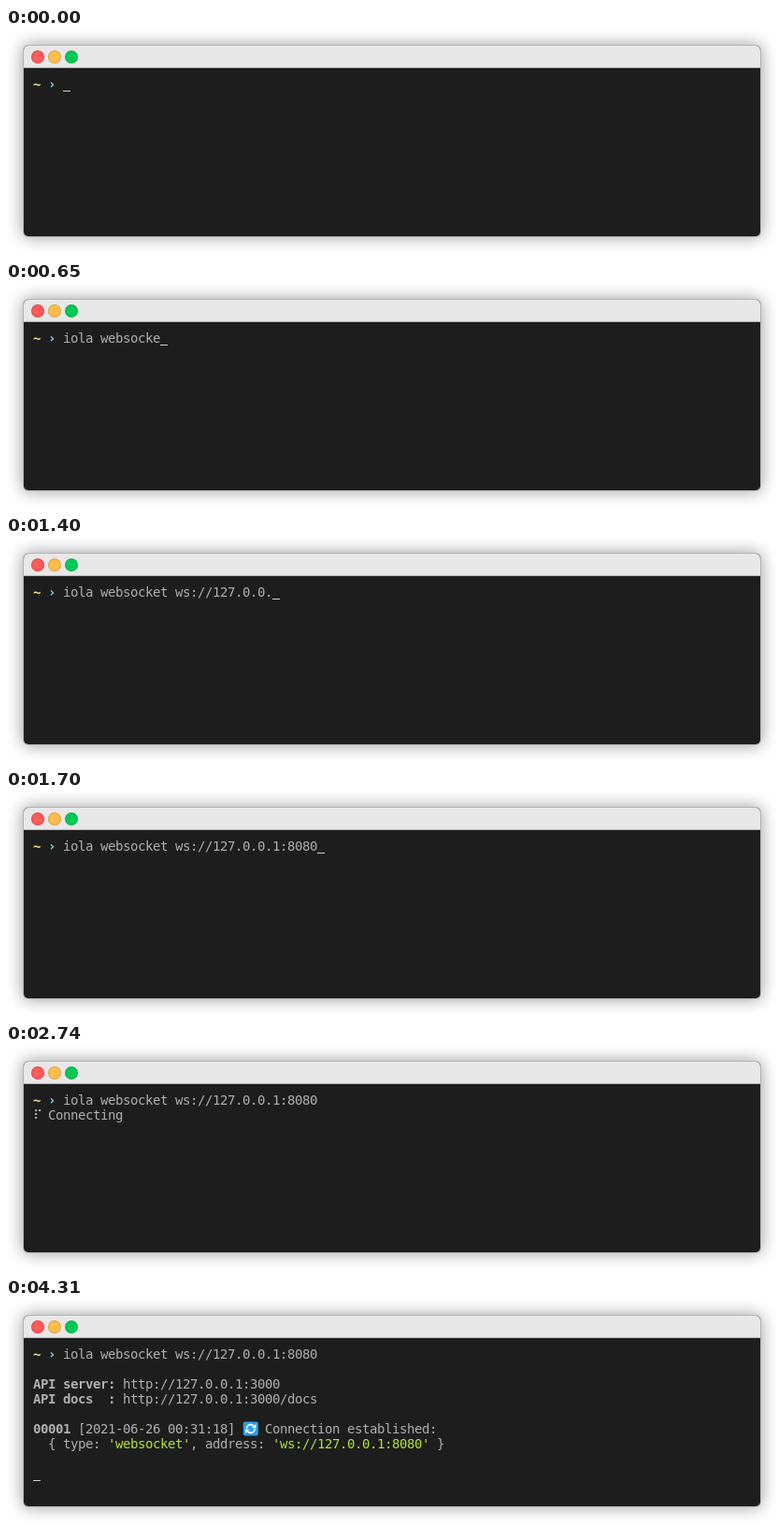
These frames come from a looping animation (826 px wide and 242 px high, 6780 ms). An HTML page with a canvas:

```html
<!DOCTYPE html>
<html lang="en">
<head>
<meta charset="utf-8">
<title>Terminal session</title>
<style>
  html, body { margin: 0; width: 100%; height: 100%; overflow: hidden; background: #fff; }
  canvas { display: block; width: 826px; height: 242px; }
</style>
</head>
<body>
<canvas id="stage" width="826" height="242"></canvas>
<script>
const ctx = document.getElementById('stage').getContext('2d');

const LOOP = 6780;
const KEY_DELAY = 50;
const SPIN_START = 2020, SPIN_STEP = 80, SPIN_END = 3020;
const SERVER_READY = 3310, CONNECTED = 4310;

const CELL = { w: 8, h: 16, left: 29, top: 52, ascent: 13 };
const FONT = '14px "DejaVu Sans Mono", "DejaVu Sans", monospace';
const COLOR = {
  text: '#afafaf', cursor: '#d2d2d2', path: '#ebdf86', prompt: '#75dff2',
  string: '#b3e33b', body: '#1d1d1d', bar: '#e8e8e8', border: '#b3b3b3'
};
const BUTTONS = [['#ff5c5c', '#e33e41'], ['#ffbd4c', '#e09e3e'], ['#00ca56', '#14ae46']];
const COMMAND = 'iola websocket ws://127.0.0.1:8080';
const SPINNER = [...'⠋⠙⠹⠸⠼⠴⠦⠧⠇⠏'];

const cellX = col => CELL.left + col * CELL.w;
const cellY = row => CELL.top + row * CELL.h;

function print(row, col, text, color = COLOR.text, bold = false) {
  ctx.font = (bold ? 'bold ' : '') + FONT;
  ctx.fillStyle = color;
  [...text].forEach((char, i) => {
    if (char !== ' ') ctx.fillText(char, cellX(col + i), cellY(row) + CELL.ascent);
  });
}

function cursor(row, col) {
  ctx.fillStyle = COLOR.cursor;
  ctx.fillRect(cellX(col), cellY(row) + CELL.h - 1, CELL.w, 1);
}

function roundRect(x, y, w, h, r, color) {
  ctx.beginPath();
  ctx.roundRect(x, y, w, h, r);
  ctx.fillStyle = color;
  ctx.fill();
}

function disc(x, y, r, color) {
  ctx.beginPath();
  ctx.arc(x, y, r, 0, 2 * Math.PI);
  ctx.fillStyle = color;
  ctx.fill();
}

function drawWindow() {
  ctx.fillStyle = '#fff';
  ctx.fillRect(0, 0, 826, 242);
  ctx.save();
  ctx.shadowColor = 'rgba(0, 0, 0, 0.4)';
  ctx.shadowBlur = 18;
  roundRect(18, 18, 790, 206, 6, COLOR.border);
  ctx.restore();
  roundRect(19, 19, 788, 204, 5, COLOR.body);
  roundRect(19, 19, 788, 23, [5, 5, 0, 0], COLOR.bar);
  ctx.fillStyle = COLOR.border;
  ctx.fillRect(19, 42, 788, 1);
  BUTTONS.forEach(([fill, edge], i) => {
    disc(34 + i * 18, 31, 7, edge);
    disc(34 + i * 18, 31, 6, fill);
  });
}

function drawRefreshIcon(row, col) {
  ctx.save();
  ctx.translate(cellX(col) + 8.8, cellY(row) + 8);
  roundRect(-8, -7.5, 16, 15, 2, '#2d9fe3');
  ctx.strokeStyle = ctx.fillStyle = '#fff';
  ctx.lineWidth = 1.7;
  for (let half = 0; half < 2; half++) {
    ctx.beginPath();
    ctx.arc(0, 0, 4.3, Math.PI * 1.02, Math.PI * 1.75);
    ctx.stroke();
    ctx.beginPath();
    ctx.moveTo(5.6, -5.2);
    ctx.lineTo(5.6, -0.6);
    ctx.lineTo(1.2, -0.9);
    ctx.fill();
    ctx.rotate(Math.PI);
  }
  ctx.restore();
}

function drawServerInfo() {
  print(2, 0, 'API server:', COLOR.text, true);
  print(2, 12, 'http://127.0.0.1:3000');
  print(3, 0, 'API docs  :', COLOR.text, true);
  print(3, 12, 'http://127.0.0.1:3000/docs');
}

function drawConnection() {
  print(5, 0, '00001', COLOR.text, true);
  print(5, 6, '[2021-06-26 00:31:18]');
  drawRefreshIcon(5, 28);
  print(5, 31, 'Connection established:');
  print(6, 2, '{ type:            , address:                       }');
  print(6, 10, "'websocket'", COLOR.string);
  print(6, 32, "'ws://127.0.0.1:8080'", COLOR.string);
}

function draw(time) {
  drawWindow();
  print(0, 0, '~', COLOR.path, true);
  print(0, 2, '›', COLOR.prompt, true);

  const keys = Math.floor(time / KEY_DELAY);
  print(0, 4, COMMAND.slice(0, keys));

  if (keys <= COMMAND.length) {
    cursor(0, 4 + keys);
  } else if (time >= SPIN_START && time < SPIN_END) {
    const step = Math.floor((time - SPIN_START) / SPIN_STEP);
    print(1, 0, SPINNER[step % SPINNER.length]);
    print(1, 2, 'Connecting');
  } else if (time < SERVER_READY) {
    cursor(1, 0);
  } else {
    drawServerInfo();
    if (time >= CONNECTED) drawConnection();
    cursor(time >= CONNECTED ? 8 : 5, 0);
  }
}

const start = performance.now();
function tick() {
  draw((performance.now() - start) % LOOP);
  requestAnimationFrame(tick);
}
tick();
</script>
</body>
</html>
```
